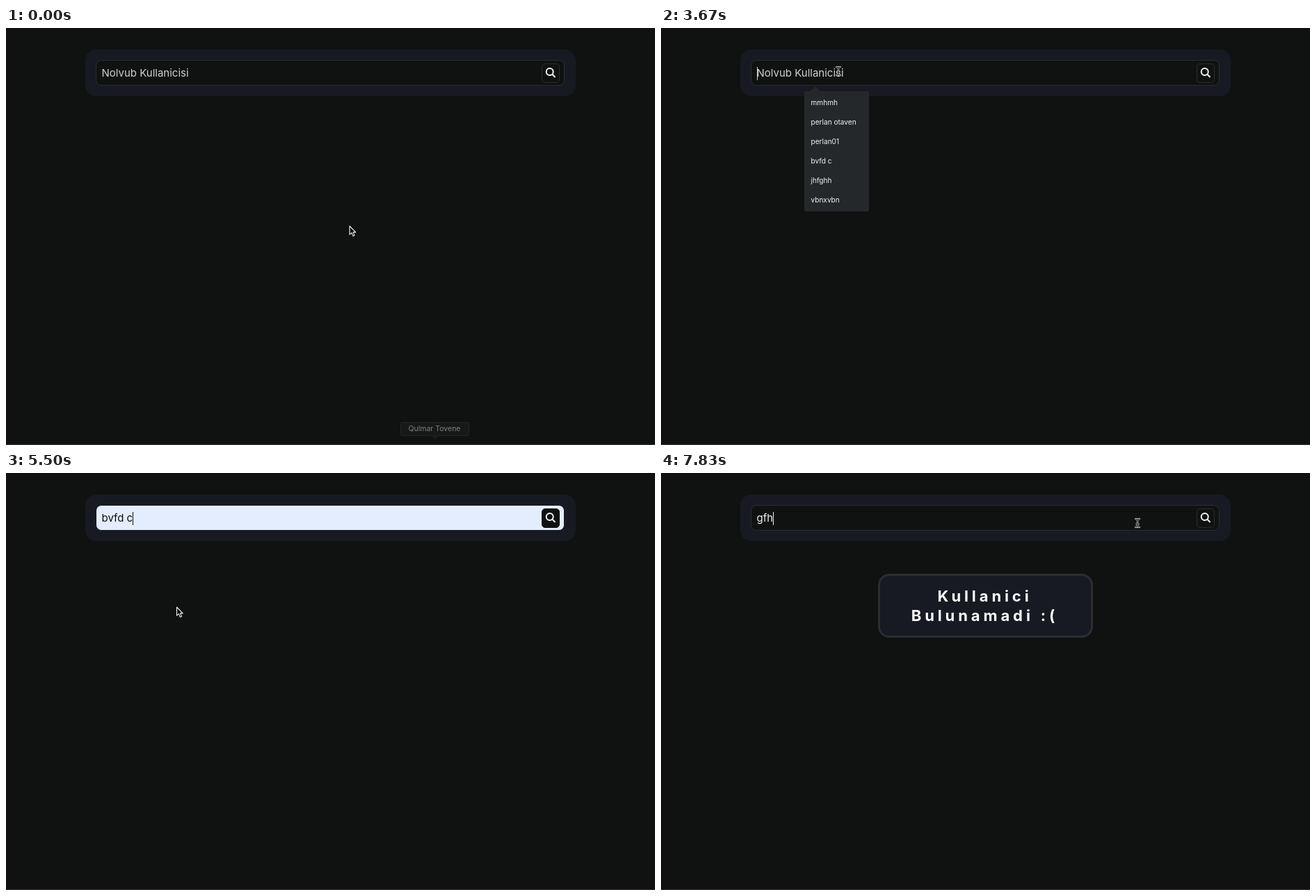
Animation of 933x600 px, one loop 8 s. Source, as an HTML page:

```html
<!DOCTYPE html>
<html lang="tr">
<head>
<meta charset="utf-8">
<title>Kullanici arama</title>
<style>
  * { box-sizing: border-box; }
  html, body { margin: 0; width: 100%; height: 100%; overflow: hidden; background: #101211; }
  body { position: relative; font-family: Inter, "Open Sans", sans-serif; }
  body > *, .field > * { position: absolute; }
  [hidden] { display: none !important; }

  .panel { left: 113.5px; top: 31px; width: 705.5px; height: 67px; border-radius: 16px; background: #171a22; }
  .field { left: 129px; top: 46px; width: 674px; height: 37px; border: 1px solid #2b2d31; border-radius: 8px; background: #101211; }
  .field.filled { border-color: #171a22; background: #e4edfd; }
  .value { left: 7.5px; top: 0; font-size: 15px; line-height: 35px; white-space: pre; color: #f2f2f2; }
  .value.hint { color: #cfd0d0; }
  .filled .value { color: #0b0c0d; }
  .value.preview { font-size: 12px; font-weight: 500; line-height: 37px; }
  .caret { display: inline-block; width: 1px; height: 19px; margin-right: -1px; vertical-align: middle; background: currentColor; }
  .button { left: 640px; top: 4px; width: 26px; height: 28px; border: 1px solid #2a2c2f; border-radius: 5px; background: #101211; }
  .filled .button { border-color: #101211; }

  .menu { left: 206px; top: 91px; width: 93px; height: 173px; padding-top: 2px; border-radius: 3px; background: #25282b; color: #f2f2f2; font-size: 10.1px; line-height: 28px; }
  .menu::before { content: ""; position: absolute; left: 9px; top: -7px; border: 7px solid transparent; border-top: 0; border-bottom-color: #25282b; }
  .menu div { height: 28px; padding-left: 9.5px; white-space: pre; }
  .menu .on { background: #3b3d40; }

  .notice { left: 312px; top: 145px; width: 309px; height: 92px; padding: 15px 2px 0 0; border: 3px solid #2b2d33; border-radius: 16px; background: #171a22; color: #fff; font-size: 22px; font-weight: 700; line-height: 28px; letter-spacing: 4.9px; text-align: center; white-space: nowrap; }
  .tip { left: 566.5px; top: 567px; width: 99px; height: 20px; border: 1px solid #242626; border-radius: 3px; background: #171919; color: #7f8181; font-size: 10.5px; line-height: 18px; text-align: center; white-space: nowrap; }
  .tip::after { content: ""; position: absolute; left: 43px; top: 18px; border: 6px solid transparent; border-bottom: 0; border-top-color: #1b1d1d; }
  .edge { left: 0; top: 599px; width: 933px; height: 1px; background: #303333; }
  #pointer { left: 0; top: 0; width: 24px; height: 24px; overflow: visible; }
</style>
</head>
<body>
<div class="panel"></div>
<div class="field" id="field">
  <div class="value" id="value"><span id="before" class="caret"></span><span id="text"></span><span id="after" class="caret"></span></div>
  <svg class="button" viewBox="0 0 24 26" fill="none" stroke="#f4f5f5" stroke-width="2" stroke-linecap="round">
    <circle cx="10.7" cy="11" r="5"/><path d="M14.4 14.7 17.9 18.2"/>
  </svg>
</div>
<div class="notice" id="notice">Kullanici<br>Bulunamadi :(</div>
<div class="menu" id="menu"></div>
<div class="tip" id="tip">Qulmar Tovene</div>
<div class="edge"></div>
<svg id="pointer">
  <defs>
    <path id="bar" d="M-2.7-6Q0-6 0-4V4Q0 6-2.7 6M2.7-6Q0-6 0-4M0 4Q0 6 2.7 6M-1.3 1.5H1.3"/>
  </defs>
  <path id="arrow" d="M0 0V12.2L2.8 9.6 4.9 14.3 7 13.4 5 8.9H8.7Z" fill="#0c0d0d" stroke="#f2f2f2" stroke-width="1.1" stroke-linejoin="round"/>
  <g id="beam" fill="none" stroke-linecap="round">
    <use href="#bar" stroke="#c9caca" stroke-width="2.5"/>
    <use href="#bar" stroke="#151717"/>
  </g>
  <path id="hand" d="M0 .5Q1-.8 2 .5L3.2 4.5Q4.4 3.6 5.2 4.7Q6.5 4 7.1 5.3Q8.6 4.9 8.7 6.5L8.4 9.5 7.2 11.8V13H2.2L1.9 11.4-1.7 8Q-2.3 6.4-.5 6.5L1.1 7.4Z" fill="#f5f5f5" stroke="#101211" stroke-width=".8" stroke-linejoin="round"/>
</svg>
<script>
  const LOOP = 8000;
  const HINT = "Nolvub Kullanicisi";
  const ROWS = ["mmhmh", "perlan otaven", "perlan01", "bvfd c", "jhfghh", "vbnxvbn"];
  const $ = id => document.getElementById(id);

  // time, pointer x, pointer y, then whatever changes at that moment
  const steps = [
    [0, 494, 285, { shape: "arrow", text: "", caret: "", menu: false, row: -1, filled: false, notice: false, tip: true }],
    [170, 245, 66, { shape: "beam", tip: false }],
    [2500, 335.5, 130.5, { shape: "arrow" }],
    [2670, 310, 114],
    [2830, 282, 98],
    [3000, 264, 74, { shape: "beam" }],
    [3170, 257, 65],
    [3330, 255, 62, { caret: "before" }],
    [3670, 255, 62, { menu: true }],
    [3830, 258, 74],
    [4000, 264, 101, { shape: "arrow", row: 0 }],
    [4170, 265.5, 110.5],
    [4330, 265, 114],
    [4500, 262, 129, { row: 1 }],
    [4670, 257, 147],
    [4830, 251, 168, { row: 2 }],
    [5000, 247, 187, { row: 3 }],
    [5170, 245.5, 193],
    [5330, 245.5, 193, { menu: false, row: -1, text: "bvfd c", caret: "after", filled: true }],
    [5670, 320, 168],
    [5830, 505, 116],
    [6000, 690, 76, { shape: "beam" }],
    [6170, 776, 64, { shape: "hand" }],
    [6330, 785, 63],
    [6500, 785, 63, { text: "", caret: "", filled: false }],
    [6670, 785, 63, { notice: true }],
    [6830, 738, 63, { shape: "beam" }],
    [7000, 590, 62],
    [7170, 447, 63],
    [7330, 418, 64, { menu: true, caret: "before" }],
    [7500, 450, 66, { menu: false, text: "g", caret: "after" }],
    [7670, 572, 69, { text: "gf" }],
    [7830, 685, 72, { text: "gfh" }]
  ];

  let last = {};
  const states = steps.map(([time, x, y, change]) => last = { ...last, ...change, time, x, y });

  const rows = ROWS.map(name => {
    const row = $("menu").appendChild(document.createElement("div"));
    row.textContent = name;
    return row;
  });

  const show = (id, on) => $(id).toggleAttribute("hidden", !on);

  function draw(s) {
    const preview = s.row >= 0;
    $("text").textContent = preview ? ROWS[s.row] : s.text || HINT;
    $("value").className = "value" + (preview ? " preview" : s.text ? "" : " hint");
    $("field").classList.toggle("filled", preview || s.filled);
    rows.forEach((row, i) => row.classList.toggle("on", i === s.row));
    for (const id of ["menu", "notice", "tip"]) show(id, s[id]);
    for (const id of ["before", "after"]) show(id, s.caret === id);
    for (const id of ["arrow", "beam", "hand"]) $(id).style.display = s.shape === id ? "" : "none";
    $("pointer").style.transform = `translate(${s.x}px, ${s.y}px)`;
  }

  let shown;
  function tick() {
    const time = performance.now() % LOOP;
    const state = states.findLast(s => s.time <= time);
    if (state !== shown) draw(shown = state);
    requestAnimationFrame(tick);
  }
  tick();
</script>
</body>
</html>
```
